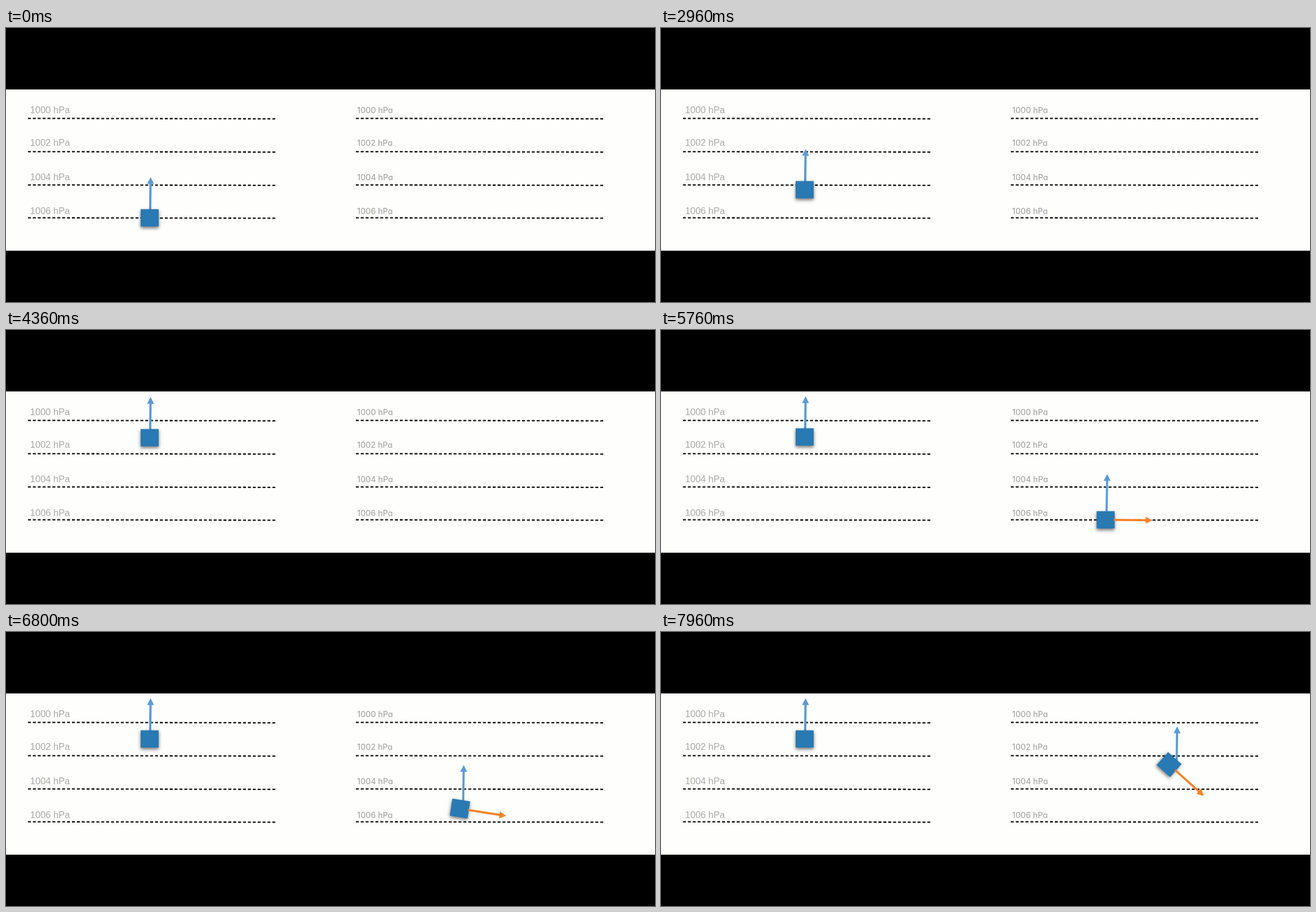
Animation of 1152 by 486 pixels, one loop 8 s. Source, as an HTML page with a canvas:

```html
<!DOCTYPE html>
<html lang="en">
<head>
<meta charset="utf-8">
<title>Pressure gradient force</title>
<style>
  html, body { margin: 0; width: 100%; height: 100%; overflow: hidden; background: #000; }
  svg, canvas { position: absolute; left: 0; top: 0; width: 1152px; height: 486px; }
  text { fill: #a8a8a8; }
  .left { font: 16.5px "Liberation Sans", Arial, sans-serif; }
  .right { font: 500 14.2px Inter, Lato, sans-serif; font-feature-settings: "cv11" 1; }
  line { stroke: #0a0a0a; stroke-width: 2.3; stroke-dasharray: 5.2 3.476; }
</style>
</head>
<body>
<svg viewBox="0 0 1152 486">
  <rect y="109" width="1152" height="286" fill="#fefefd"/>
  <g id="chart"></g>
</svg>
<canvas width="1152" height="486"></canvas>
<script>
const LOOP = 8000;
const BLUE = '#5b9bd5', ORANGE = '#f98228', CUBE = '#2979b3';
const ctx = document.querySelector('canvas').getContext('2d');

// isobars: label, label baseline, line height
const isobars = [[1000, 151, 160.3], [1002, 209, 219.3], [1004, 270, 278.3], [1006, 329.5, 336.6]];
const panels = [['left', 39, 42.8], ['right', 621, 623.3]];
document.getElementById('chart').innerHTML = panels.map(([side, x, textX]) =>
  isobars.map(([value, base, y]) =>
    `<text class="${side}" x="${textX}" y="${base}">${value} hPa</text>` +
    `<line x1="${x}" y1="${y}" x2="${x + 439}" y2="${y + 0.8}"/>`).join('')).join('');

const clamp = v => Math.min(1, Math.max(0, v));
const sineInOut = u => (1 - Math.cos(Math.PI * clamp(u))) / 2;

function arrow(x0, y0, x1, y1, color, width) {
  const len = Math.hypot(x1 - x0, y1 - y0), head = 12, half = 6.2, w = width / 2;
  ctx.save();
  ctx.translate(x0, y0);
  ctx.rotate(Math.atan2(y1 - y0, x1 - x0));
  ctx.fillStyle = color;
  ctx.beginPath();
  ctx.moveTo(0, -w);
  ctx.lineTo(len - head, -w);
  ctx.lineTo(len - head, -half);
  ctx.lineTo(len, 0);
  ctx.lineTo(len - head, half);
  ctx.lineTo(len - head, w);
  ctx.lineTo(0, w);
  ctx.fill();
  ctx.restore();
}

// The shadow turns with the cube.
function cube(x, y, angle) {
  ctx.save();
  ctx.translate(x, y);
  ctx.rotate(angle);
  ctx.shadowColor = 'rgba(0,0,0,0.55)';
  ctx.shadowBlur = 6;
  ctx.shadowOffsetX = -2.5 * Math.sin(angle);
  ctx.shadowOffsetY = 2.5 * Math.cos(angle);
  ctx.fillStyle = CUBE;
  ctx.fillRect(-16, -15.3, 32, 30.6);
  ctx.restore();
}

function drawLeft(t) {
  const rise = 147 * sineInOut((t - 1940) / 2580);
  arrow(255.9, 323 - rise, 256.7, 264.5 - rise, BLUE, 4);
  cube(255, 336.7 - rise, 0);
}

function drawRight(t) {
  const phase = Math.max(0, t - 5920) * 0.035 * Math.PI / 180;
  const s = 0.677 * (1 - Math.cos(phase));
  const angle = s * Math.PI / 2;

  ctx.globalAlpha = clamp((t - 4420) / 420);
  const bx = 792 + s * (200 + 150 * s);
  const by = 255.5 - s * (208 - 38 * s);
  arrow(bx - 1, by + 66, bx, by, BLUE, 3.8);

  const cx = 789.3 + s * (154 + 195 * s);
  const cy = 336.7 - s * (253 - 71 * s);
  cube(cx, cy, angle);

  ctx.save();
  ctx.translate(cx, cy);
  ctx.rotate(angle);
  arrow(14.5, 0.2, 83, 0.8, ORANGE, 3.8);
  ctx.restore();
  ctx.globalAlpha = 1;
}

const start = performance.now();
function frame(now) {
  const t = Math.max(0, now - start) % LOOP;
  ctx.clearRect(0, 0, 1152, 486);
  drawLeft(t);
  if (t > 4420) drawRight(t);
  requestAnimationFrame(frame);
}
frame(start);
</script>
</body>
</html>
```
